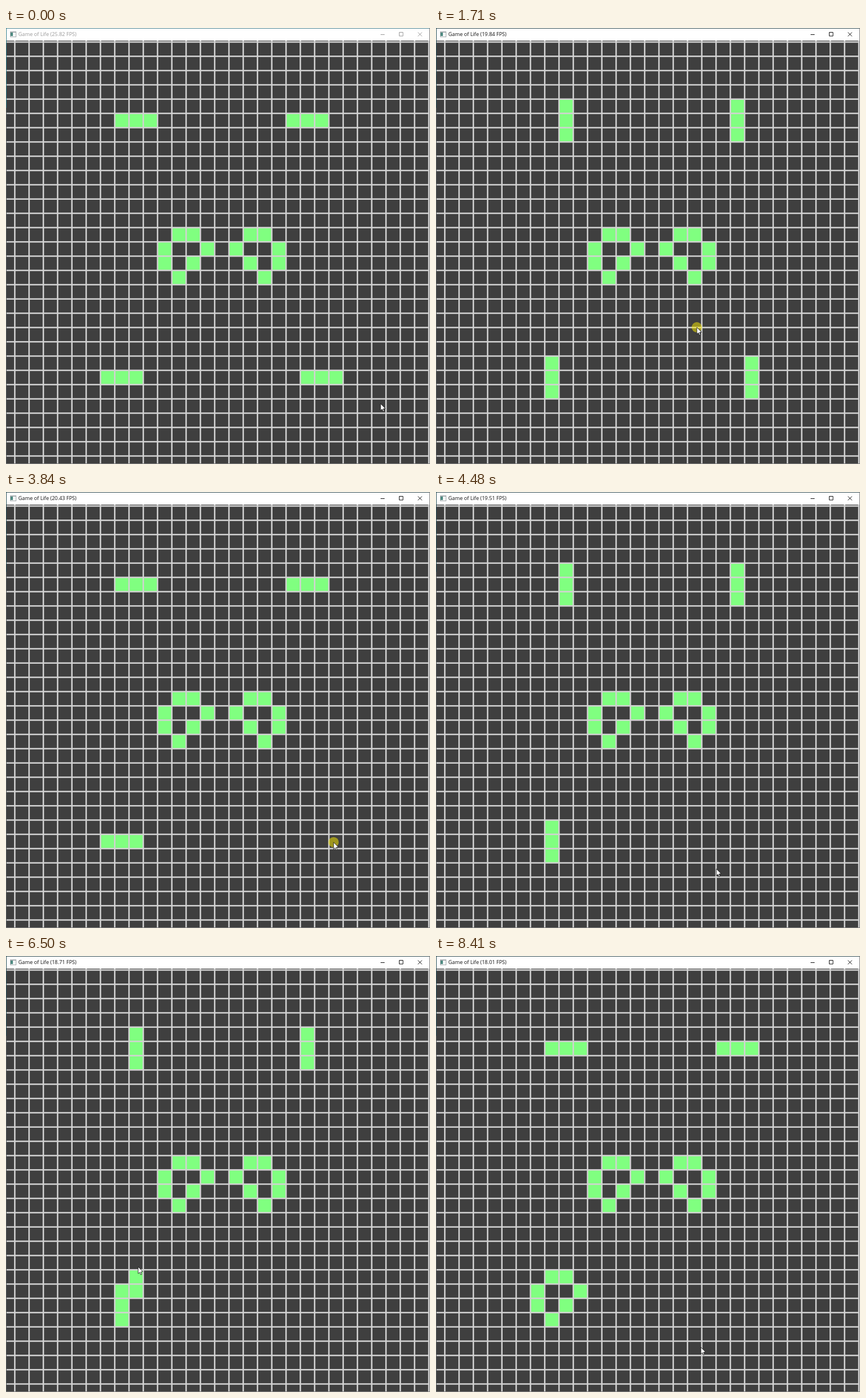
Recreate the animation shown at these times as an HTML page with a canvas. Size 738x759 px, loop 8540 ms.

```html
<!DOCTYPE html>
<html lang="en">
<head>
<meta charset="utf-8">
<title>Game of Life</title>
<style>
  html, body { margin: 0; width: 100%; height: 100%; overflow: hidden; background: #fff; }
  canvas { position: absolute; left: 0; top: 0; display: block; }
  #title {
    position: absolute; left: 21.5px; top: 4px; height: 14px;
    font: 9px/14px "Open Sans", "Noto Sans", sans-serif; white-space: pre;
  }
</style>
</head>
<body>
<canvas id="stage" width="738" height="759"></canvas>
<div id="title"></div>
<script>
const W = 738, H = 759, BAR = 22;
const PITCH = 24.85, X0 = 15.3, Y0 = 24.4, LINE = 2.5;
const LOOP = 8540, STEPS = 84, LEAD = 40;   // the screen refreshes once per step
const ctx = document.getElementById('stage').getContext('2d');
const title = document.getElementById('title');

// Everything below is timed in steps
const running = [[1, 26], [41, 51], [69, 83]];
const focus = 16, wipes = [28, 32, 37], paints = [57, 61];
const presses = [focus, ...wipes, ...paints];
const rates = [[0, 25.82], [8, 21.87], [17, 19.84], [26, 23.04], [44, 19.51], [64, 18.71], [83, 18.01]];
const path = [
  [0, 652, 654], [7, 454, 521], [18, 454, 521], [24, 528, 607], [28, 528, 607], [37, 575, 607],
  [44, 488, 656], [53, 258, 586], [57, 228, 584], [64, 230, 541], [71, 340, 643], [83, 461, 681]
];

// Eased values between the two keys around a step
function sample(keys, step) {
  const i = Math.max(1, keys.findIndex(k => k[0] >= step));
  const [a, ...from] = keys[i - 1], [b, ...to] = keys[i];
  const u = (step - a) / (b - a), k = u * u * (3 - 2 * u);
  return from.map((v, j) => v + (to[j] - v) * k);
}

const past = (list, step) => list.filter(s => s <= step).length;

// One generation per step while running, but every sixth step is missed
function generation(step) {
  let n = 0;
  for (let s = 1; s <= step; s++)
    if (s % 6 && running.some(([a, b]) => s >= a && s <= b)) n++;
  return n;
}

const blinker = (c, r, up) => [-1, 0, 1].map(d => up ? [c, r + d] : [c + d, r]);
const loaf = (c, r, flip) =>
  [[1, 0], [2, 0], [0, 1], [3, 1], [0, 2], [2, 2], [1, 3]].map(([x, y]) => [c + (flip ? 3 - x : x), r + y]);

function cellsAt(step) {
  const up = generation(step) % 2 === 1;
  const drawn = [[8, 22], [8, 21]].slice(0, past(paints, step));
  return [
    ...blinker(8, 5, up), ...blinker(20, 5, up),
    ...loaf(10, 13), ...loaf(15, 13, true),
    ...blinker(21, 23, up).slice(past(wipes, step)),
    ...(step >= running[2][0] ? loaf(6, 21) : [...blinker(7, 23, up), ...drawn])
  ];
}

function box(color, x, y, w, h) {
  ctx.fillStyle = color;
  ctx.fillRect(x, y, w, h);
}

function drawBar(active) {
  box('#fff', 0, 0, W, BAR);
  // window icon
  box('#a9aeb1', 7, 6, 11, 10);
  box('#f4f6f6', 8, 8, 9, 7);
  box('#4d8a80', 8, 8, 4, 6);
  ctx.strokeStyle = active ? '#111' : '#999';
  ctx.lineWidth = 1;
  ctx.beginPath();
  ctx.moveTo(652, 11.5); ctx.lineTo(659, 11.5);
  ctx.rect(684.5, 7.5, 6.5, 6.5);
  ctx.moveTo(717, 7.5); ctx.lineTo(724, 14.5);
  ctx.moveTo(724, 7.5); ctx.lineTo(717, 14.5);
  ctx.stroke();
}

function drawGrid(live) {
  box('#3f3f3f', 0, BAR, W, H - BAR);
  for (const [c, r] of live) box('#80ff80', X0 + c * PITCH, Y0 + r * PITCH, PITCH, PITCH);
  for (let i = 0; i < 30; i++) {
    box('#d2d2d2', X0 + i * PITCH - LINE / 2, BAR, LINE, H - BAR);
    box('#d2d2d2', 0, Y0 + i * PITCH - LINE / 2, W, LINE);
  }
}

function drawRim(active) {
  box(active ? '#3a5258' : '#4f8794', 0, 0, W, 1);
  box('#555a5c', 0, 0, 1, H);
  box(active ? '#2c5058' : '#35808c', 0, 0, 1, 139);
  box('#7c7c7c', W - 1, 0, 1, H);
  box('#7c7c7c', 0, H - 1, W, 1);
}

function drawPointer(x, y, pressed) {
  if (pressed) {
    ctx.fillStyle = 'rgba(255,240,0,.5)';
    ctx.beginPath();
    ctx.arc(x, y, 9, 0, 7);
    ctx.fill();
  }
  ctx.save();
  ctx.translate(x, y);
  ctx.beginPath();
  [[0, 0], [0, 12], [2.7, 9.6], [4.6, 13.8], [6.4, 13], [4.6, 9], [8.3, 8.6]]
    .forEach(([a, b]) => ctx.lineTo(a, b));
  ctx.closePath();
  ctx.fillStyle = '#fff';
  ctx.fill();
  ctx.strokeStyle = '#111';
  ctx.lineWidth = 0.8;
  ctx.stroke();
  ctx.restore();
}

let shown = -1;
function render(time) {
  const step = Math.min(STEPS - 1, Math.floor((time + LEAD) / LOOP * STEPS));
  if (step === shown) return;
  shown = step;
  const active = step >= focus;
  drawGrid(cellsAt(step));
  drawBar(active);
  drawRim(active);
  drawPointer(...sample(path, step), presses.some(s => step === s || step === s + 1));
  title.textContent = `Game of Life (${sample(rates, step)[0].toFixed(2)} FPS)`;
  title.style.color = active ? '#111' : '#999';
}

const start = performance.now();
function loop() {
  render((performance.now() - start) % LOOP);
  requestAnimationFrame(loop);
}
loop();
</script>
</body>
</html>
```
